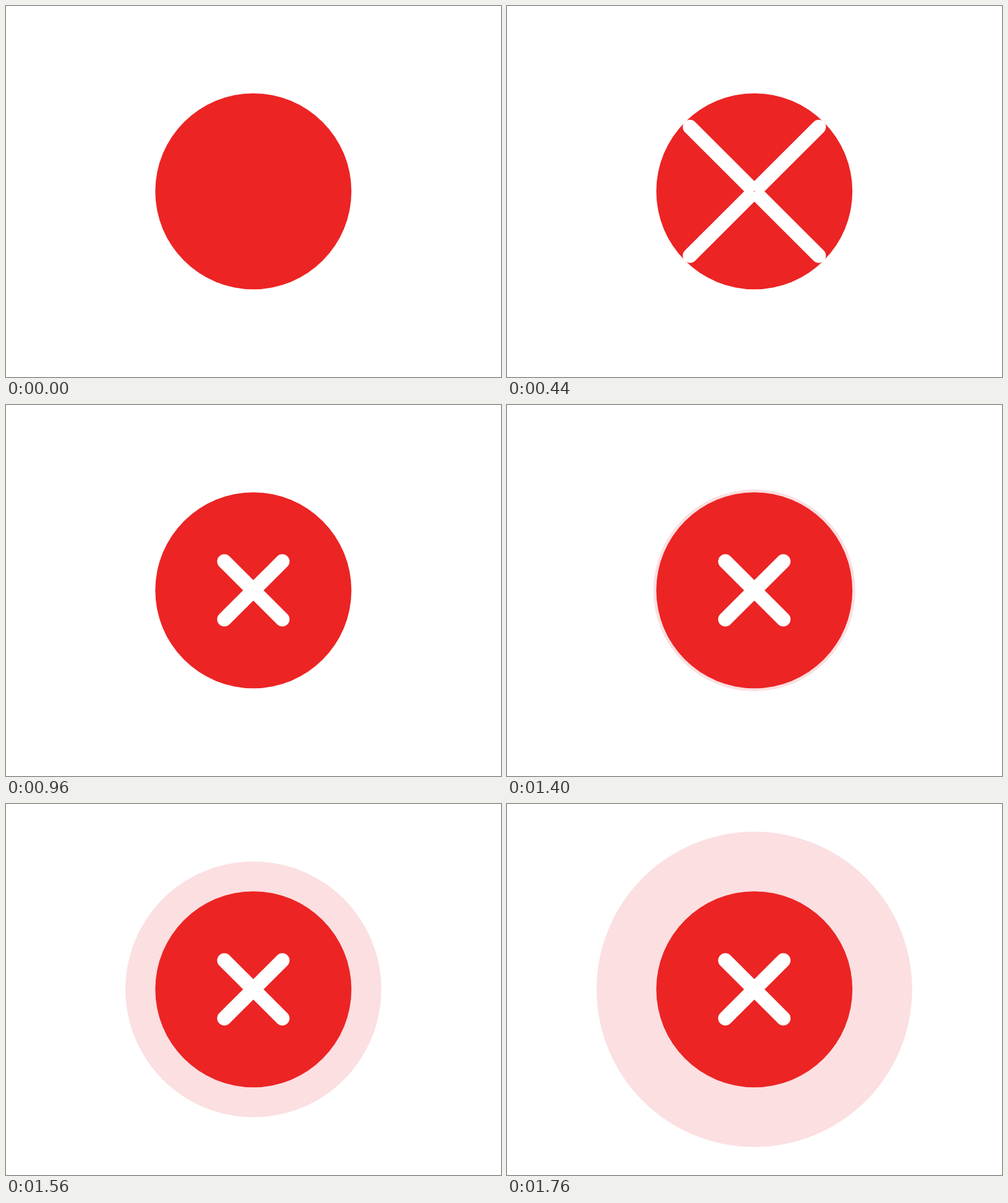
These frames come from a looping animation (800x600 px, 2400 ms). An HTML page with a canvas:

```html
<!DOCTYPE html>
<html lang="en">
<head>
<meta charset="utf-8">
<title>Error badge</title>
<style>
  html, body { margin: 0; width: 100%; height: 100%; overflow: hidden; background: #fff; }
  canvas { display: block; width: 800px; height: 600px; }
</style>
</head>
<body>
<canvas id="stage" width="800" height="600"></canvas>
<script>
const ctx = document.getElementById('stage').getContext('2d');

const LOOP = 2400, STEP = 40;
const CX = 399.75, CY = 299.75;
const DISC = 158.5, HALO = 255;
const STROKE = 23.4;
const FAR = 104, NEAR = 46.8; // arm reach along x and y

const clamp = v => Math.min(1, Math.max(0, v));
const mix = (a, b, p) => a + (b - a) * p;
const span = (t, from, to) => clamp((t - from) / (to - from));

// Symmetric cubic Bezier ease with handles (h, 0) and (1 - h, 1)
function ease(x, h = 0.2) {
  let lo = 0, hi = 1;
  for (let i = 0; i < 24; i++) {
    const s = (lo + hi) / 2, r = 1 - s;
    const at = 3 * h * s * r * r + 3 * (1 - h) * s * s * r + s * s * s;
    if (at < x) lo = s; else hi = s;
  }
  return lo * lo * (3 - 2 * lo);
}

function circle(r, color) {
  ctx.fillStyle = color;
  ctx.beginPath();
  ctx.arc(CX, CY, r, 0, Math.PI * 2);
  ctx.fill();
}

function cross(inner, outer) {
  ctx.strokeStyle = '#fff';
  ctx.lineWidth = STROKE;
  ctx.lineCap = 'round';
  ctx.beginPath();
  for (const sx of [-1, 1]) {
    for (const sy of [-1, 1]) {
      ctx.moveTo(CX + sx * outer, CY + sy * outer);
      ctx.lineTo(CX + sx * inner, CY + sy * inner);
    }
  }
  ctx.stroke();
}

function draw(t) {
  ctx.fillStyle = '#fff';
  ctx.fillRect(0, 0, 800, 600);

  const grow = span(t, 1360, 1760);
  if (grow > 0) circle(mix(DISC, HALO, ease(grow)), '#fbdfe1');
  circle(DISC, '#ec2424');

  // Arms grow inwards, then their outer ends pull back
  const reach = span(t, 0, 480);
  const shrink = span(t, 480, 960);
  if (reach > 0) cross(mix(FAR, 0, reach), mix(FAR, NEAR, shrink));
}

const start = performance.now();
function tick() {
  const t = (performance.now() - start) % LOOP;
  draw(Math.floor(t / STEP) * STEP);
  requestAnimationFrame(tick);
}
tick();
</script>
</body>
</html>
```
